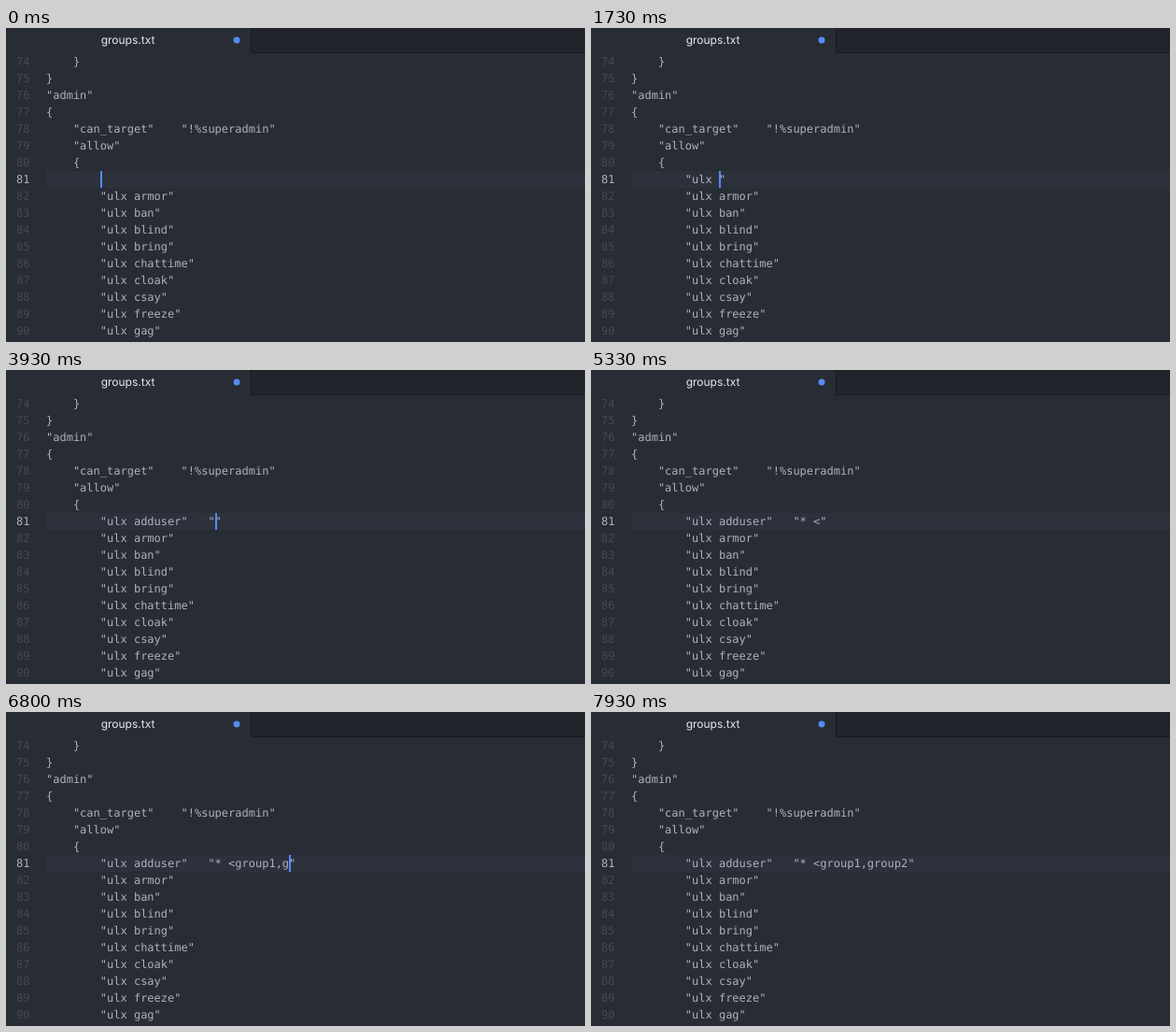
An HTML page with a canvas that plays this animation: 620x336 px, repeating every 8 s.

```html
<!DOCTYPE html>
<html lang="en">
<head>
<meta charset="utf-8">
<title>Editing groups.txt</title>
<style>
html, body { margin: 0; width: 100%; height: 100%; overflow: hidden; background: #282c34; }
canvas { display: block; }
</style>
</head>
<body>
<canvas id="stage" width="620" height="336"></canvas>
<script>
const ctx = document.getElementById('stage').getContext('2d');
const LOOP = 8000, LEFT = 43, CHAR = 7.224, ROW = 18, EDIT_TOP = 153, INDENT = 8;
const MONO = '12px "DejaVu Sans Mono", monospace';
const BLINK = 400, BLINK_DELAY = 260;

const lines = [
  '    }', '}', '"admin"', '{', '    "can_target"    "!%superadmin"', '    "allow"', '    {', '',
  ...['armor', 'ban', 'blind', 'bring', 'chattime', 'cloak', 'csay', 'freeze', 'gag']
    .map(name => `        "ulx ${name}"`)
];
const words = ['ulx', 'adduser', 'addgroup', 'adduserid', 'groupdeny', 'groupallow'];

// [time, typed text, letters matched in the suggestion list (0 = closed)]
const steps = [
  [140, '', 0], [1070, '"', 0],
  [1270, 'u', 0], [1400, 'l', 0], [1470, 'x', 0], [1530, '', 3], [1670, ' ', 3], [1730, '', 0],
  [1800, 'a', 0], [2070, 'd', 0], [2270, 'd', 3], [2470, 'u', 3], [2530, '', 4],
  [2600, 's', 5], [2730, 'e', 6], [2800, 'r', 6], [2870, '', 7],
  [3070, '"', 0], [3270, '   ', 0], [3930, '"', 0], [4470, '*', 0], [4870, ' ', 0], [5070, '<', 0],
  [5400, 'g', 0], [5530, 'r', 0], [5600, 'o', 0], [5670, '', 3], [5870, 'u', 4], [6000, 'p', 5],
  [6270, '1', 5], [6330, '', 0], [6470, ',', 0], [6530, '', 0],
  [6800, 'g', 0], [6930, 'r', 0], [7000, 'o', 0], [7070, '', 3], [7130, 'u', 4], [7270, 'p', 4],
  [7330, '', 5], [7600, '2', 5], [7670, '', 0]
];

const columnX = col => LEFT + col * CHAR;

function rect(x, y, w, h, color) {
  ctx.fillStyle = color;
  ctx.fillRect(x, y, w, h);
}

function text(str, x, y, color, font = MONO) {
  ctx.font = font;
  ctx.fillStyle = color;
  ctx.fillText(str, x, y);
}

function drawTabs() {
  rect(262, 0, 358, 27, '#21252b');
  rect(262, 26, 358, 1, '#181a1f');
  rect(262, 0, 1, 27, '#181a1f');
  ctx.textAlign = 'center';
  text('groups.txt', 130.5, 16.5, '#e6e8ec', '12px Inter, sans-serif');
  ctx.textAlign = 'left';
  ctx.fillStyle = '#568af2';
  ctx.beginPath();
  ctx.arc(247, 13, 3.5, 0, 2 * Math.PI);
  ctx.fill();
}

function drawMenu(line, matched) {
  const start = line.search(/\w+ ?$/);
  const prefix = line.slice(start, start + matched);
  const items = words.filter(word => word.startsWith(prefix));
  const x = columnX(INDENT + start), left = Math.round(x - 7), top = EDIT_TOP + ROW;

  ctx.save();
  ctx.shadowColor = 'rgba(0, 0, 0, .4)';
  ctx.shadowBlur = 6;
  ctx.shadowOffsetY = 2;
  ctx.fillStyle = '#21252b';
  ctx.beginPath();
  ctx.roundRect(left, top, 200, items.length * 24, 3);
  ctx.fill();
  ctx.restore();

  ctx.fillStyle = '#3a3f4b';
  ctx.beginPath();
  ctx.roundRect(left, top, 200, 24, items.length > 1 ? [3, 3, 0, 0] : 3);
  ctx.fill();
  items.forEach((item, i) => {
    const y = top + 16 + i * 24;
    text(prefix, x, y, i ? '#e0e3e8' : '#fff', 'bold ' + MONO);
    text(item.slice(matched), x + matched * CHAR, y, i ? '#9da5b4' : '#fff');
  });
}

function draw(time) {
  const done = steps.filter(([at]) => at <= time);
  const [since, , matched] = done.at(-1) || steps[0];
  const typed = done.map(step => step[1]).join('');
  const openQuote = typed.split('"').length % 2 === 0;

  rect(0, 0, 620, 336, '#282c34');
  rect(LEFT, EDIT_TOP, 577, ROW, '#2c313c');
  drawTabs();
  lines.forEach((line, i) => {
    const y = 40 + i * ROW, current = i === 7;
    text(74 + i, 11, y, current ? '#abb2bf' : '#434956');
    text(current ? ' '.repeat(INDENT) + typed + (openQuote ? '"' : '') : line, LEFT, y, '#abb2bf');
  });

  const idle = time - since - BLINK_DELAY;
  if (idle < 0 || Math.floor(idle / BLINK) % 2) {
    rect(Math.round(columnX(INDENT + typed.length)), EDIT_TOP, 2, ROW, '#528bff');
  }
  if (matched) drawMenu(typed, matched);
}

ctx.textRendering = 'geometricPrecision';
const began = performance.now();
(function tick() {
  draw((performance.now() - began) % LOOP);
  requestAnimationFrame(tick);
})();
</script>
</body>
</html>
```
